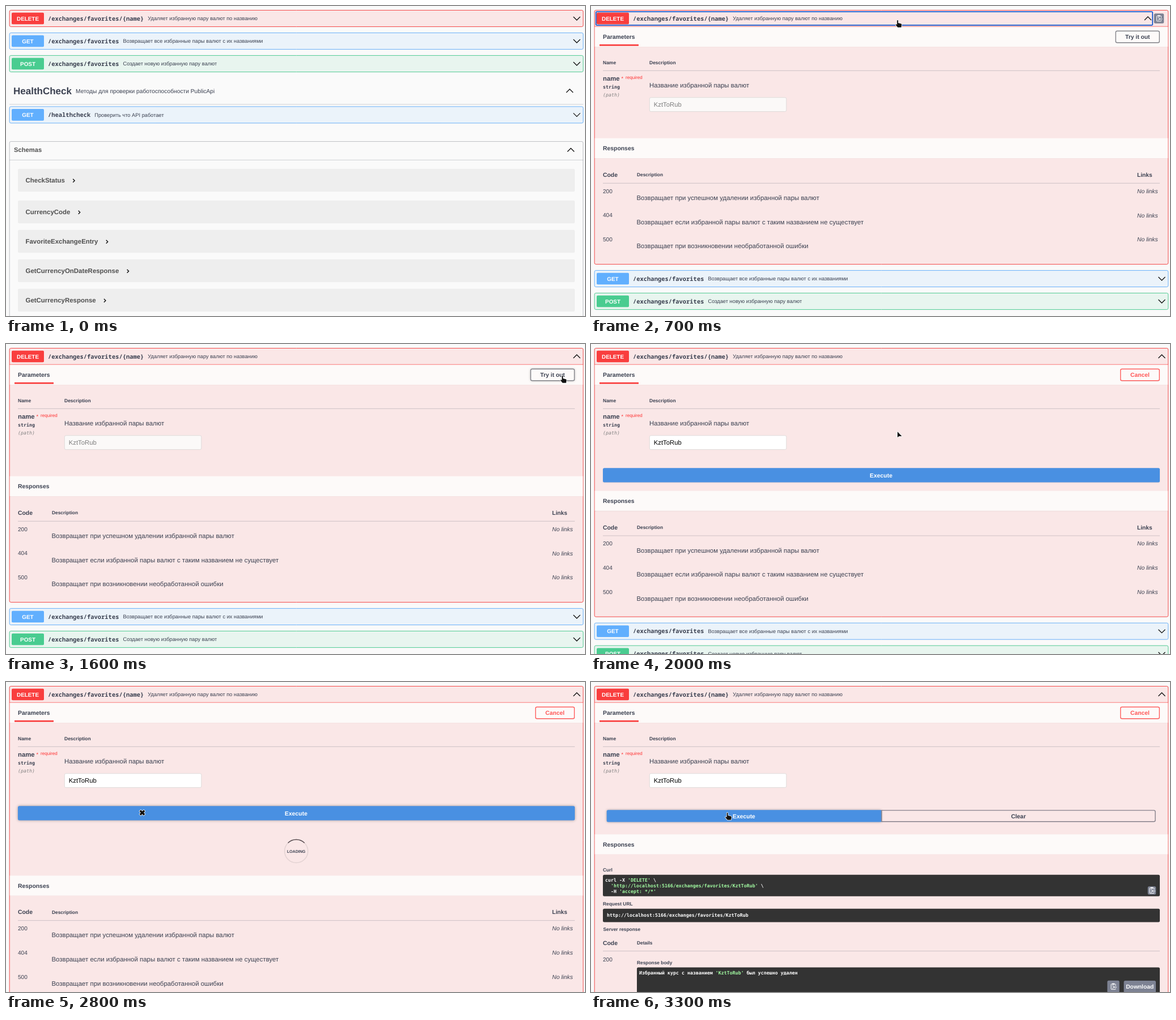
An HTML page with a canvas that plays this animation: 1022 by 548 pixels, repeating every 6300 ms.

```html
<!DOCTYPE html>
<html lang="ru">
<head>
<meta charset="utf-8">
<title>API docs</title>
<style>
html, body { margin: 0; width: 100%; height: 100%; overflow: hidden; background: #fafafa; }
canvas { display: block; width: 1022px; height: 548px; }
</style>
</head>
<body>
<canvas id="stage" width="1022" height="548"></canvas>
<script>
const ctx = document.getElementById('stage').getContext('2d');
const LOOP = 6300, STEP = 100;
const SANS = '"Liberation Sans", Arial, sans-serif';
const PATH_MONO = '"Noto Sans Mono", "DejaVu Sans Mono", monospace';
const CODE_MONO = '"DejaVu Sans Mono", monospace';
const INK = '#3b4151', RED = '#f93e3e', BLUE = '#61affe', GREEN = '#49cc90';
const RULE = 'rgba(59,65,81,0.25)', GREY = '#7d8293';
const TINT = { [RED]: '#fae7e7', [BLUE]: '#ebf3fa', [GREEN]: '#e8f5ef' };

// Pointer hotspot: step, x, y
const TRACK = [
  [1, 575, 500], [4, 541, 25], [7, 541, 25], [8, 555, 30], [10, 604, 43], [13, 885, 62],
  [14, 982, 56], [17, 982, 56], [18, 850, 88], [20, 541, 155], [21, 420, 180],
  [23, 262, 224], [26, 240.5, 231], [63, 240.5, 231]
];
const FOCUS = 5, OPEN = 6, PRESS = 15, TRY = 17, SEND = 28, DONE = 30;

let mouse = null;

function pointerAt(k) {
  if (k < 1) return null;
  const i = TRACK.findIndex(p => p[0] >= k);
  const b = TRACK[i], a = TRACK[Math.max(0, i - 1)];
  const u = b[0] === a[0] ? 1 : (k - a[0]) / (b[0] - a[0]);
  return { x: a[1] + (b[1] - a[1]) * u, y: a[2] + (b[2] - a[2]) * u, hand: false };
}

function over(x, y, w, h) {
  const hit = mouse && mouse.x >= x && mouse.x <= x + w && mouse.y >= y && mouse.y <= y + h;
  if (hit) mouse.hand = true;
  return hit;
}

function shadow(blur, alpha, dy = 0) {
  ctx.shadowBlur = blur;
  ctx.shadowColor = `rgba(0,0,0,${alpha})`;
  ctx.shadowOffsetY = dy;
}

function box(x, y, w, h, { r = 2.5, fill, line, width = 1 } = {}) {
  ctx.beginPath();
  ctx.roundRect(x, y, w, h, r);
  if (fill) { ctx.fillStyle = fill; ctx.fill(); }
  ctx.shadowColor = 'transparent';
  if (line) { ctx.strokeStyle = line; ctx.lineWidth = width; ctx.stroke(); }
}

// Places text by the vertical centre of its capitals
function text(s, x, cy, size, { style = '', font = SANS, color = INK, align = 'left' } = {}) {
  ctx.font = `${style} ${size}px ${font}`;
  ctx.fillStyle = color;
  ctx.textAlign = align;
  ctx.fillText(s, x, cy + size * 0.36);
  return ctx.measureText(s).width;
}
const bold = (s, x, cy, size = 10.4, opts = {}) => text(s, x, cy, size, { style: 'bold', ...opts });

function rule(y, x = 21, w = 983) {
  ctx.fillStyle = RULE;
  ctx.fillRect(x, y, w, 0.9);
}

function poly(points, color, width) {
  ctx.beginPath();
  points.forEach(([x, y]) => ctx.lineTo(x, y));
  ctx.strokeStyle = color;
  ctx.lineWidth = width;
  ctx.stroke();
}

function chevron(x, y, up) {
  const d = up ? -3 : 3;
  poly([[x - 6, y - d], [x, y + d], [x + 6, y - d]], '#111', 1.3);
}

function copyIcon(cx, cy, size) {
  box(cx - size / 2, cy - size / 2, size, size, { fill: GREY });
  ctx.save();
  ctx.translate(cx, cy);
  box(-4, -4.5, 8, 9.5, { r: 0.8, line: '#fff' });
  ctx.fillStyle = '#fff';
  ctx.fillRect(-2, -5.7, 4, 2.4);
  ctx.fillRect(-2.3, -1.8, 3, 0.9);
  ctx.fillRect(-2.3, 2.4, 2.3, 0.9);
  ctx.fillStyle = GREY;
  ctx.fillRect(2, -1, 4, 4);
  poly([[6, 1], [0, 1]], '#fff', 1);
  poly([[2, -1], [0, 1], [2, 3]], '#fff', 1);
  ctx.restore();
}

function row(cy, method, color, path, note, { open = false, focus = false, height = 29 } = {}) {
  const top = cy - 14.5, hover = over(6, top, 1013, 29);
  shadow(2, 0.15);
  box(6.2, top, 1012.6, height, { fill: TINT[color], line: color, width: 0.9 });
  if (open) {
    ctx.fillStyle = color;
    ctx.fillRect(6.2, 35.8, 1012.6, 0.8);
  }
  box(10, cy - 10.3, 57, 20.6, { r: 2, fill: color });
  bold(method, 38.5, cy, 9.9, { color: '#fff', align: 'center' });
  const w = bold(path, 74, cy, 10.46, { font: PATH_MONO });
  text(note, 81 + w, cy, 9.3);
  if (hover) copyIcon(1002.5, cy, 17.5);
  chevron(hover ? 983 : 1007.5, cy, open);
  if (focus) box(8.8, cy - 11.9, hover ? 982.4 : 1007.4, 23.8, { r: 1.5, line: '#1659cf', width: 1.8 });
}

function sectionHead(title, y) {
  shadow(1.5, 0.12, 0.8);
  box(6.7, y, 1011.6, 35.3, { r: 0, fill: '#fdfaf9' });
  bold(title, 21, y + 17.7);
}

function button(label, x, w, color, line) {
  const hover = over(x, 44, w, 21);
  ctx.save();
  shadow(hover ? 4 : 2, hover ? 0.35 : 0.12, hover ? 0 : 0.7);
  box(x + 0.7, 44.3, w - 1.4, 20.4, { fill: '#fdfaf9', line, width: 1.4 });
  ctx.restore();
  bold(label, x + w / 2, 54.3, 10.3, { color, align: 'center' });
}

function parameters(k) {
  const editing = k >= TRY;
  sectionHead('Parameters', 36.8);
  ctx.fillStyle = RED;
  ctx.fillRect(15, 67.8, 69, 2.8);
  if (editing) button('Cancel', 934, 70, '#ff5555', '#ff6060');
  else button('Try it out', 925.5, 78.5, INK, '#85868c');

  bold('Name', 21, 100.3, 8.5);
  bold('Description', 103, 100.3, 8.5);
  rule(113.8);
  bold('name', 21, 128.2, 11.3);
  text('*', 53.5, 127.3, 9, { color: '#ff3030' });
  text('required', 61, 126.2, 8.1, { color: '#ff3030' });
  bold('string', 21, 143.5, 8.31, { font: CODE_MONO });
  text('(path)', 21, 157, 8.31, { style: 'italic', font: CODE_MONO, color: '#808080' });
  text('Название избранной пары валют', 103, 140.3, 11.43);
  box(103.3, 161.8, 241.6, 24.8, { fill: editing ? '#fff' : '#fbf9f8', line: '#dcd8d7', width: 0.9 });
  text('KztToRub', 110.8, 174.3, 11.3, { color: editing ? '#000' : '#7e7e7e' });
}

function responseTable(y) {
  bold('Code', 21, y);
  bold('Description', 81, y, 8.4);
  bold('Links', 964, y, 10.2);
  rule(y + 14.6);
  [
    ['200', 'Возвращает при успешном удалении избранной пары валют'],
    ['404', 'Возвращает если избранной пары валют с таким названием не существует'],
    ['500', 'Возвращает при возникновении необработанной ошибки']
  ].forEach(([code, note], i) => {
    const cy = y + 28.8 + i * 42.8;
    text(code, 21, cy, 10.1);
    text(note, 80.5, cy + 11.7, 11.43);
    text('No links', 964, cy, 10.3, { style: 'italic' });
  });
}

function executeFull() {
  ctx.save();
  if (over(21, 219, 983, 25.5)) shadow(5, 0.35);
  else shadow(2, 0.1, 0.7);
  box(21, 219.2, 983, 25.4, { fill: '#4990e2' });
  ctx.restore();
  bold('Execute', 512, 232, 10.4, { color: '#fff', align: 'center' });
}

function spinner(k) {
  const turn = (k - SEND) * Math.PI / 5, x = 512.3, y = 299;
  const arc = (from, to, color) => {
    ctx.beginPath();
    ctx.arc(x, y, 20.6, from, to);
    ctx.strokeStyle = color;
    ctx.lineWidth = 1.5;
    ctx.stroke();
  };
  arc(0, Math.PI * 2, 'rgba(85,85,85,0.14)');
  arc(turn - Math.PI * 0.75, turn - Math.PI * 0.25, 'rgba(30,20,25,0.7)');
  bold('LOADING', x, 299.5, 7.05, { align: 'center' });
}

// CSS "ease" curve
function ease(t) {
  if (t >= 1) return 1;
  let lo = 0, hi = 1, u = t;
  for (let i = 0; i < 20; i++) {
    u = (lo + hi) / 2;
    const x = 3 * (1 - u) ** 2 * u * 0.25 + 3 * (1 - u) * u * u * 0.25 + u ** 3;
    if (x < t) lo = u; else hi = u;
  }
  return 3 * (1 - u) ** 2 * u * 0.1 + 3 * (1 - u) * u * u + u ** 3;
}

function buttonPair(grow, h) {
  const x = 27.7, y = 226.2, w = 969, left = w * grow / (1 + grow), mid = y + h / 2;
  box(x + left + 0.7, y + 0.7, w - left - 1.4, h - 1.4, { r: [0, 2.5, 2.5, 0], line: '#85808a', width: 1.4 });
  ctx.save();
  if (over(x, y, left, h)) shadow(4, 0.3);
  box(x, y, left, h, { r: [2.5, 0, 0, 2.5], fill: '#4990e2' });
  ctx.restore();
  bold('Execute', x + left / 2, mid, 10.4, { color: '#fff', align: 'center' });
  bold('Clear', x + (left + w) / 2, mid, 10.4, { align: 'center' });
}

// Quoted parts are shown in green
function code(s, x, cy) {
  s.split(/('[^']*')/).forEach(part => {
    x += bold(part, x, cy, 8.31, { font: CODE_MONO, color: part[0] === "'" ? '#a2fca2' : '#fff' });
  });
}

function liveResponse(dy) {
  ctx.save();
  ctx.translate(0, dy);
  sectionHead('Responses', 269.2);
  const label = (s, x, cy) => bold(s, x, cy, 8.4);
  const dark = (x, y, w, h) => box(x, y, w, h, { fill: '#333' });

  label('Curl', 21, 331.5);
  dark(21, 340.7, 983, 38);
  code("curl -X 'DELETE' \\", 25, 350);
  code("  'http://localhost:5166/exchanges/favorites/KztToRub' \\", 25, 360);
  code("  -H 'accept: */*'", 25, 370);
  copyIcon(990, 368.5, 14.5);

  label('Request URL', 21, 391.6);
  dark(21, 400.7, 983, 23.8);
  code('http://localhost:5166/exchanges/favorites/KztToRub', 28, 412.5);

  label('Server response', 21.5, 437.2);
  bold('Code', 21, 461);
  label('Details', 81, 461);
  rule(475.2);
  text('200', 21, 490, 10.1);
  label('Response body', 81, 495.7);
  dark(81, 504.6, 923, 80);
  code("Избранный курс с названием 'KztToRub' был успешно удален", 85, 514);
  copyIcon(922, 538.4, 21.3);
  box(940.5, 528, 56.5, 21.3, { fill: GREY });
  bold('Download', 968.7, 538.4, 10.25, { color: '#fff', align: 'center' });
  ctx.restore();
}

function operation(k) {
  parameters(k);
  if (k >= DONE) {
    const grow = ease((k * STEP - 2935) / 300);
    const extra = 4.2 * (1 - grow);
    buttonPair(grow, 21.3 + extra);
    liveResponse(extra);
    return;
  }
  if (k >= TRY) executeFull();
  if (k >= SEND) spinner(k);
  const dy = growth(k);
  sectionHead('Responses', 233.8 + dy);
  responseTable(298.2 + dy);
}

function growth(k) {
  return k >= SEND ? 108.4 : k >= TRY ? 25.7 : 0;
}

function lowerPage(dy) {
  row(62 + dy, 'GET', BLUE, '/exchanges/favorites', 'Возвращает все избранные пары валют с их названиями');
  row(102 + dy, 'POST', GREEN, '/exchanges/favorites', 'Создает новую избранную пару валют');
  if (dy) return;
  bold('HealthCheck', 13, 150.2, 17);
  text('Методы для проверки работоспособности PublicApi', 123, 150.6, 10.22);
  chevron(995, 150, true);
  rule(173.4, 6, 1013);
  row(192.4, 'GET', BLUE, '/healthcheck', 'Проверить что API работает');

  box(6.2, 239.5, 1012.4, 400, { line: 'rgba(59,65,81,0.35)', width: 0.9 });
  bold('Schemas', 14, 254.4, 11.2, { color: '#505050' });
  chevron(997, 254.5, true);
  rule(271.8, 6, 1013);
  ['CheckStatus', 'CurrencyCode', 'FavoriteExchangeEntry', 'GetCurrencyOnDateResponse', 'GetCurrencyResponse']
    .forEach((name, i) => {
      const cy = i ? 312 + i * 52 : 308;
      box(21, cy - 20.3, 983, 40.6, { fill: '#eeeeee' });
      const end = 34.5 + bold(name, 34.5, cy, 11.46, { color: '#505050' });
      poly([[end + 14.3, cy - 2.2], [end + 17.3, cy + 0.8], [end + 14.3, cy + 3.8]], '#111', 1.4);
    });
}

function drawPointer(k) {
  if (!mouse) return;
  ctx.save();
  ctx.translate(mouse.x, mouse.y);
  ctx.lineJoin = 'round';
  const shape = d => {
    const p = new Path2D(d);
    ctx.strokeStyle = '#fff';
    ctx.lineWidth = 1.5;
    ctx.stroke(p);
    ctx.fillStyle = '#111';
    ctx.fill(p);
  };
  if (k >= SEND && k < DONE) {
    shape('M-2.5 -5L0 -2.4L2.5 -5L5 -2.5L2.5 0L5 2.5L2.5 5L0 2.4L-2.5 5L-5 2.5L-2.5 0L-5 -2.5Z');
  } else if (mouse.hand) {
    shape('M-.8 .5Q.2 -.5 1.2 .5V5L6.2 6.2Q7.6 6.6 7.4 8.2L6.6 12.8H.4L-3.2 8.6Q-3.6 7.2 -2.2 7.2L-.8 8Z');
  } else {
    shape('M0 0V10L2.8 8L7.6 8Z');
  }
  ctx.restore();
}

function draw(k) {
  mouse = pointerAt(k);
  ctx.textRendering = 'geometricPrecision';
  ctx.fillStyle = '#fafafa';
  ctx.fillRect(0, 0, 1022, 548);
  const open = k >= OPEN;
  const height = !open ? 29 : k >= DONE ? 900 : 449 + growth(k);
  row(22, 'DELETE', RED, '/exchanges/favorites/{name}', 'Удаляет избранную пару валют по названию',
    { open, height, focus: k >= FOCUS && k < PRESS });
  if (open) operation(k);
  if (k < DONE) lowerPage(open ? 420 + growth(k) : 0);
  drawPointer(k);
}

const start = performance.now();
function tick() {
  const t = (performance.now() - start) % LOOP;
  draw(Math.floor(t / STEP));
  requestAnimationFrame(tick);
}
tick();
</script>
</body>
</html>
```
